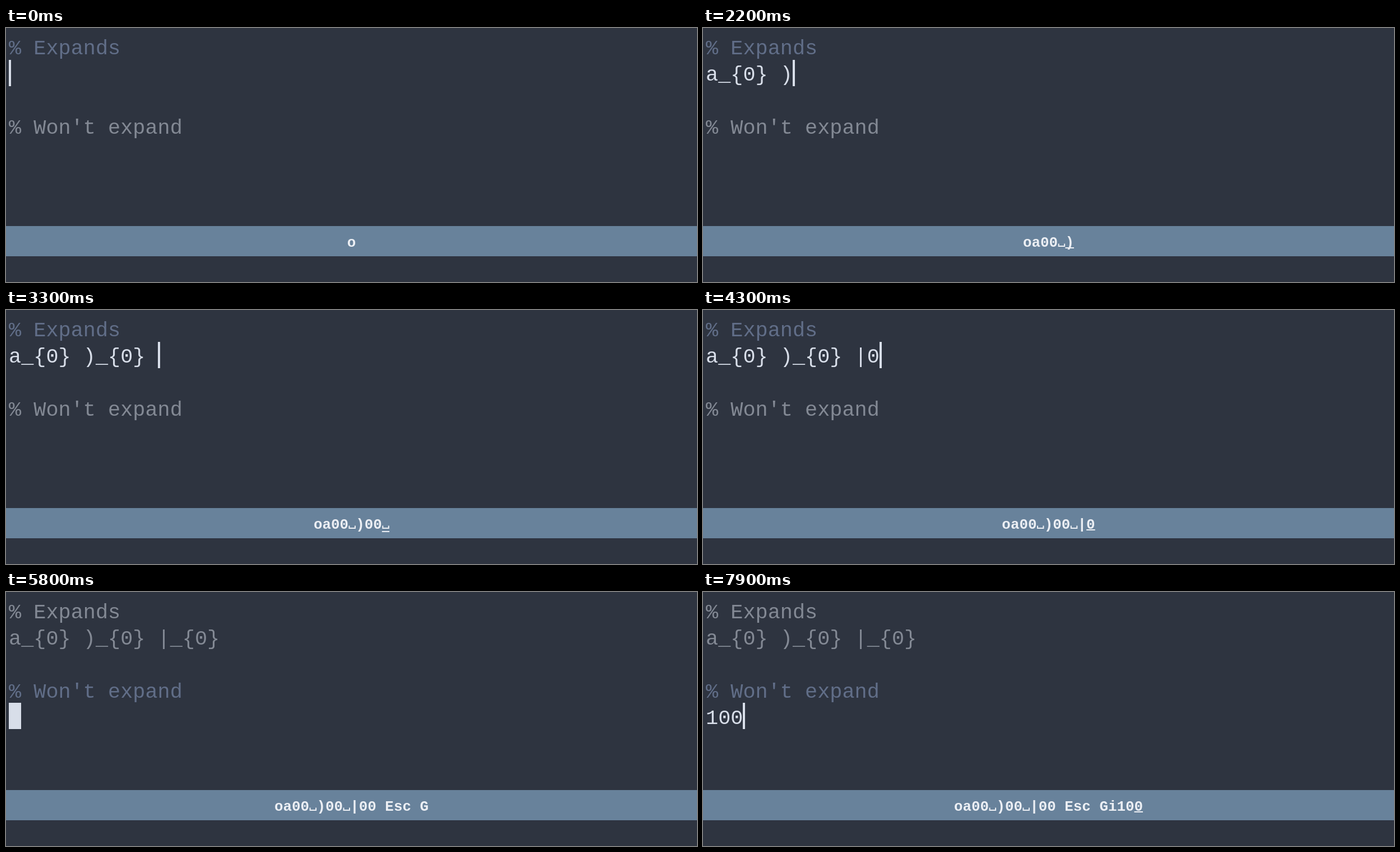
Animation, 1233 px wide and 454 px high, one loop 8000 ms. Source, as an HTML page with a canvas:

```html
<!DOCTYPE html>
<html lang="en">
<head>
<meta charset="utf-8">
<title>Subscript expansion</title>
<style>
  html, body { margin: 0; width: 100%; height: 100%; overflow: hidden; background: #2e3440; }
  canvas { display: block; }
</style>
</head>
<body>
<canvas id="stage" width="1233" height="454"></canvas>
<script>
const ctx = document.getElementById('stage').getContext('2d');
const LOOP = 8000;
const FAMILY = '"Liberation Mono", monospace';
const COLORS = {
  back: '#2e3440', text: '#d8dee9', comment: '#616e88', dim: '#838994',
  match: '#88c0d0', matchBack: '#4c566a', bar: '#68829b', keys: '#eceff4'
};
const LEFT = 5, CELL = 22.13, LINE = 47.1, ROW_TOP = 10, BASELINE = 37.3;
const KEY_CELL = 15.52, SPACE_CELL = 13.3, KEY_BASE = 390.7, KEY_HOLD = 200;

// Key presses: time and label.
const KEYS = [
  [0, 'o'], [500, 'a'], [800, '0'], [1000, '0'], [1400, '␣'],
  [2200, ')'], [2500, '0'], [2700, '0'], [3200, '␣'],
  [3900, '|'], [4300, '0'], [4500, '0'],
  [5100, ' Esc'], [5600, ' G'], [6500, 'i'], [7500, '1'], [7700, '0'], [7900, '0']
];

// Buffer states: time, text of the edited line, paragraph, cursor shape.
const A = 'a_{0}', B = A + ' )_{0}', C = B + ' |_{0}';
const EDITS = [
  [0, ''], [600, 'a'], [900, 'a0'], [1100, A], [1400, A + ' '],
  [2200, A + ' )'], [2600, A + ' )0'], [2800, B], [3300, B + ' '],
  [3900, B + ' |'], [4300, B + ' |0'], [4600, C], [5200, C, 0, 'block'],
  [5600, '', 1, 'block'], [6500, '', 1], [7600, '1', 1], [7700, '10', 1], [7900, '100', 1]
];

// Font whose character advance equals the given cell width.
function fitFont(weight, cell) {
  ctx.font = `${weight} 100px ${FAMILY}`;
  return `${weight} ${100 * cell / ctx.measureText('0').width}px ${FAMILY}`;
}
const editorFont = fitFont(400, CELL);
const keyFont = fitFont(700, KEY_CELL);

const colX = col => LEFT + col * CELL;
const rowY = row => Math.round(ROW_TOP + row * LINE);

function box(color, x, y, w, h) {
  ctx.fillStyle = color;
  ctx.fillRect(x, y, w, h);
}

function write(text, row, color, col = 0) {
  ctx.font = editorFont;
  ctx.fillStyle = color;
  [...text].forEach((ch, i) => ctx.fillText(ch, colX(col + i), ROW_TOP + row * LINE + BASELINE));
}

function cellBox(color, row, col, width = Math.round(CELL)) {
  box(color, Math.round(colX(col)), rowY(row), width, 47);
}

function recolor(text, row, col, back, color) {
  cellBox(back, row, col);
  write(text[col] || '', row, color, col);
}

function drawEditor(t) {
  const [, text, paragraph = 0, shape = 'bar'] = EDITS.findLast(edit => edit[0] <= t);
  const row = paragraph ? 4 : 1;
  write('% Expands', 0, paragraph ? COLORS.dim : COLORS.comment);
  write("% Won't expand", 3, paragraph ? COLORS.comment : COLORS.dim);
  if (paragraph) write(C, 1, COLORS.dim);
  write(text, row, COLORS.text);
  if (text.endsWith('}')) {
    for (const col of [text.lastIndexOf('{'), text.length - 1])
      recolor(text, row, col, COLORS.matchBack, COLORS.match);
  }
  if (shape === 'block') recolor(text, row, Math.max(0, text.length - 1), COLORS.text, COLORS.back);
  else cellBox(COLORS.text, row, text.length, 4);
}

const keyWidth = ch => ch === '␣' ? SPACE_CELL : KEY_CELL;
const labelWidth = label => [...label].reduce((sum, ch) => sum + keyWidth(ch), 0);

function drawSpaceSign(x) {
  ctx.strokeStyle = COLORS.keys;
  ctx.lineWidth = 2;
  ctx.beginPath();
  ctx.moveTo(x + 1.5, 385.5);
  ctx.lineTo(x + 1.5, 390);
  ctx.lineTo(x + 12, 390);
  ctx.lineTo(x + 12, 385.5);
  ctx.stroke();
}

function drawKeys(t) {
  box(COLORS.bar, 0, 354, 1233, 54);
  const pressed = KEYS.filter(key => key[0] <= t);
  const line = pressed.map(key => key[1]).join('');
  const width = labelWidth(line);
  let x = 616.5 - width / 2;
  const end = x + width;
  ctx.font = keyFont;
  for (const ch of line) {
    ctx.fillStyle = COLORS.keys;
    if (ch === '␣') drawSpaceSign(x);
    else ctx.fillText(ch, x, KEY_BASE);
    x += keyWidth(ch);
  }
  const [time, label] = pressed.at(-1);
  if (time > 0 && t < time + KEY_HOLD) {
    const w = labelWidth(label.trim());
    box(COLORS.keys, end - w, label === '␣' ? 395 : 392, w, 2);
  }
}

function frame() {
  const t = performance.now() % LOOP;
  box(COLORS.back, 0, 0, 1233, 454);
  drawEditor(t);
  drawKeys(t);
  requestAnimationFrame(frame);
}
frame();
</script>
</body>
</html>
```
